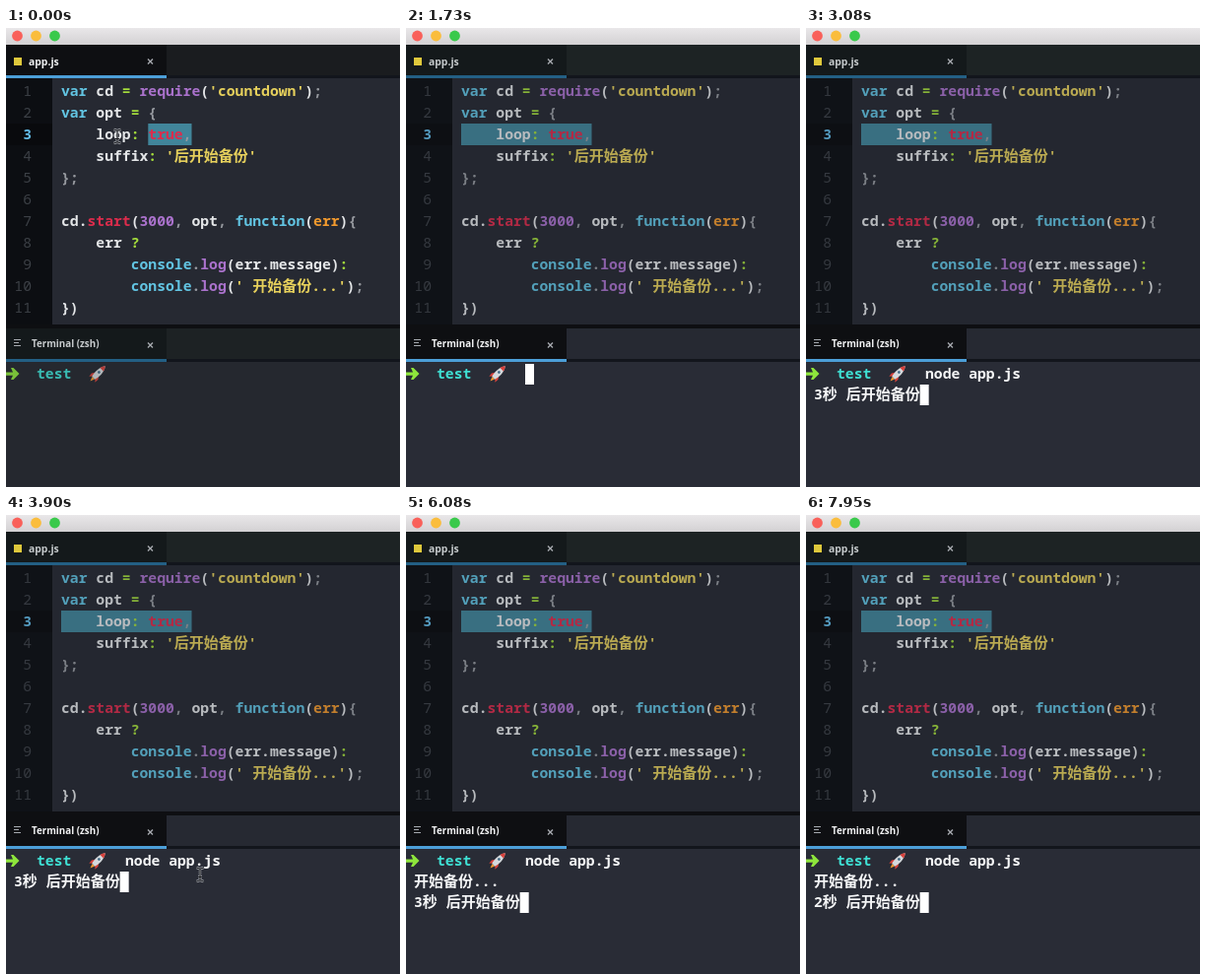
Write an HTML page with a canvas that moves like this. It is 400 px wide and 466 px high and loops after 8 s.

```html
<!DOCTYPE html>
<html lang="en">
<head>
<meta charset="utf-8">
<title>Countdown demo</title>
<style>
html, body { margin: 0; width: 100%; height: 100%; overflow: hidden; background: #262932; }
canvas { display: block; width: 400px; height: 466px; }
</style>
</head>
<body>
<canvas id="stage"></canvas>
<script>
const W = 400, H = 466, LOOP = 8000;
const FOCUS_AT = 1420, ENTER_AT = 2900, COUNT_AT = 3000;
const CELL = 8.83, WIDE = 15, LEFT = 56;
const MONO = '14.72px "Noto Sans Mono", "DejaVu Sans Mono", monospace';
const HAN = '700 15px "Noto Sans CJK SC", "Noto Sans CJK", sans-serif';

const C = {
  text: '#e4e6e8', cyan: '#62c4e2', green: '#a4dc3c', purple: '#aa72cc',
  yellow: '#e6d05c', red: '#dc2c4c', orange: '#f29a2e', grey: '#96999f'
};

const CODE = [
  [0, ['var', 'cyan'], [' cd ', 'text'], ['= ', 'green'], ['require', 'purple'], ['(', 'text'],
    ["'countdown'", 'yellow'], [')', 'text'], [';', 'grey']],
  [0, ['var', 'cyan'], [' opt ', 'text'], ['= ', 'green'], ['{', 'grey']],
  [4, ['loop', 'text'], [': ', 'green'], ['true', 'red'], [',', 'grey']],
  [4, ['suffix', 'text'], [': ', 'green'], ["'后开始备份'", 'yellow']],
  [0, ['};', 'grey']],
  [0],
  [0, ['cd.', 'text'], ['start', 'red'], ['(', 'text'], ['3000', 'purple'],
    [', ', 'grey'], ['opt', 'text'], [', ', 'grey'], ['function', 'cyan'], ['(', 'text'],
    ['err', 'orange'], [')', 'text'], ['{', 'grey']],
  [4, ['err ', 'text'], ['?', 'green']],
  [8, ['console', 'cyan'], ['.', 'grey'], ['log', 'purple'], ['(err.message)', 'text'], [':', 'green']],
  [8, ['console', 'cyan'], ['.', 'grey'], ['log', 'purple'], ['(', 'text'],
    ["' 开始备份...'", 'yellow'], [')', 'text'], [';', 'grey']],
  [0, ['})', 'text']],
  [0]
];

// Moments at which each character of the command appears.
const COMMAND = 'node app.js';
const KEYS = [1860, 1950, 2030, 2110, 2210, 2330, 2450, 2530, 2610, 2690, 2770];

const canvas = document.getElementById('stage');
const ctx = canvas.getContext('2d');
const ratio = window.devicePixelRatio || 1;
canvas.width = W * ratio;
canvas.height = H * ratio;

function rect(x, y, w, h, color) {
  ctx.fillStyle = color;
  ctx.fillRect(x, y, w, h);
}

function dot(x, y, r, color) {
  ctx.fillStyle = color;
  ctx.beginPath();
  ctx.arc(x, y, r, 0, Math.PI * 2);
  ctx.fill();
}

function lines(points, color, width) {
  ctx.strokeStyle = color;
  ctx.lineWidth = width;
  ctx.beginPath();
  for (const [x1, y1, x2, y2] of points) {
    ctx.moveTo(x1, y1);
    ctx.lineTo(x2, y2);
  }
  ctx.stroke();
}

function shape(color, path) {
  ctx.fillStyle = color;
  ctx.fill(new Path2D(path));
}

// Draws mixed Latin and Han text on the cell grid; returns the end x.
function write(str, x, y, color, weight = 600) {
  ctx.fillStyle = color;
  for (const run of str.match(/[\u4e00-\u9fff]+|[^\u4e00-\u9fff]+/g) || []) {
    const han = run.charCodeAt(0) >= 0x4e00;
    ctx.font = han ? HAN : weight + ' ' + MONO;
    ctx.fillText(run, x, y);
    x += run.length * (han ? WIDE : CELL);
  }
  return x;
}

function label(str, x, y, size, active) {
  ctx.font = '700 ' + size + 'px "Open Sans", sans-serif';
  ctx.fillStyle = active ? '#f0f1f2' : '#c6cacc';
  ctx.fillText(str, x, y);
}

function closeMark(x, y) {
  lines([[x - 2.5, y - 2.5, x + 2.5, y + 2.5], [x + 2.5, y - 2.5, x - 2.5, y + 2.5]], '#a8abb0', 1.4);
}

function ease(t, from, to) {
  const p = Math.min(1, Math.max(0, (t - from) / (to - from)));
  return p * p * (3 - 2 * p);
}

function titleBar() {
  const g = ctx.createLinearGradient(0, 0, 0, 17);
  g.addColorStop(0, '#e9e7e9');
  g.addColorStop(1, '#d3d1d3');
  rect(0, 0, W, 17, g);
  dot(11.5, 8, 5.4, '#f9605a');
  dot(30.5, 8, 5.4, '#fabd3c');
  dot(49.5, 8, 5.4, '#39c94b');
}

function tabBar(y, active, back) {
  rect(0, y, W, 34, back);
  rect(0, y, 163, 31, active ? '#0e0f12' : '#14191b');
  rect(0, y + 31, 163, 3, active ? '#4c9fd8' : '#235f84');
  rect(163, y + 31, W - 163, 3, '#12151c');
  closeMark(146.5, y + 17);
}

function editor(t, active) {
  tabBar(17, active, active ? '#1a1c1f' : '#1d2324');
  rect(8, 30, 8, 8, '#dfc83c');
  label('app.js', 23, 38, 10.4, active);

  ctx.save();
  ctx.beginPath();
  ctx.rect(0, 51, W, 250);
  ctx.clip();
  rect(0, 51, W, 250, '#262932');
  rect(0, 51, 47, 250, '#0c0e12');
  rect(0, 97, 47, 22, '#090a0d');

  const col = t < 80 ? 10 : Math.max(0, Math.round((113 - 57 * ease(t, 80, 330) - LEFT) / CELL));
  const selX = LEFT + col * CELL;
  rect(selX, 97, 188.5 - selX, 22, '#41859a');

  CODE.forEach(([indent, ...parts], i) => {
    const y = 69 + i * 22;
    const num = String(i + 1);
    const current = i === 2;
    write(num, 26 - num.length * CELL, y, current ? '#63bce8' : '#3c4046', current ? 700 : 500);
    let x = LEFT + indent * CELL;
    for (const [str, color] of parts) x = write(str, x, y, C[color]);
  });
  if (!active) rect(0, 51, W, 250, 'rgba(31,35,42,0.22)');
  ctx.restore();
}

function rocket() {
  ctx.save();
  ctx.translate(93, 351);
  ctx.rotate(Math.PI / 4);
  shape('#f59a32', 'M-1.8 6 L0 10.5 L1.8 6Z');
  shape('#d8423c', 'M-2 0 L-4.6 4 L-4.2 8 L-1.6 5Z M2 0 L4.6 4 L4.2 8 L1.6 5Z');
  shape('#d5dadd', 'M0 -11 C4 -6 3.4 2 2 6 L-2 6 C-3.4 2 -4 -6 0 -11Z');
  shape('#d8423c', 'M0 -11 C1.4 -9.2 2 -8 2.4 -6 L-2.4 -6 C-2 -8 -1.4 -9.2 0 -11Z');
  dot(0, -2, 1.4, '#426b87');
  ctx.restore();
}

function terminal(t, active) {
  rect(0, 301, W, 4, '#0e0f12');
  tabBar(305, active, active ? '#262932' : '#1d2224');
  lines([[8, 316.5, 15, 316.5], [8, 319.5, 13, 319.5], [8, 322.5, 15, 322.5]], '#a7abb1', 1);
  label('Terminal (zsh)', 26, 323.5, 9.8, active);

  rect(0, 339, W, 127, active ? '#292c36' : '#25282f');
  shape('#8ee63c', 'M0 349.5 H7 L5 345 H7.5 L13.5 351 L7.5 357 H5 L7 352.7 H0Z');
  write('test', 31, 356, '#3fe0d4', 700);
  rocket();

  const white = '#f4f5f6';
  const typed = KEYS.filter(k => t >= k).length;
  let x = write(COMMAND.slice(0, typed), 121, 356, white, 700);
  let top = 341;
  if (t >= ENTER_AT) {
    x = 0;
    top = 362;
  }
  if (t >= COUNT_AT) {
    const tick = Math.floor((t - COUNT_AT) / 1000);
    if (tick >= 3) {
      write('开始备份...', 8, 377, white, 700);
      top = 383;
    }
    x = write(3 - tick % 3 + '秒 后开始备份', 8, top + 15, white, 700);
  }
  if (active) rect(x, top, 9, 21, '#ffffff');
  else rect(0, 339, W, 127, 'rgba(37,40,47,0.2)');
}

function beam(x, y) {
  const strokes = [
    [x, y - 6, x, y + 6],
    [x - 3.5, y - 7, x - 0.5, y - 6], [x + 3.5, y - 7, x + 0.5, y - 6],
    [x - 3.5, y + 7, x - 0.5, y + 6], [x + 3.5, y + 7, x + 0.5, y + 6],
    [x - 2, y + 2.5, x + 2, y + 2.5]
  ];
  lines(strokes, 'rgba(205,208,212,0.8)', 2.4);
  lines(strokes, '#15171b', 1.1);
}

function pointer(t) {
  if (t < 1650) {
    const drag = ease(t, 80, 330), move = ease(t, 350, 800);
    const x = 113 - 55 * drag;
    beam(x + (154 - x) * move, 110 + 266 * move);
  } else if (t >= 3720 && t < 4120) {
    const p = ease(t, 3720, 3900);
    beam(185 + 12 * p, 369 - 4 * p);
  }
}

function draw(t) {
  const inTerminal = t >= FOCUS_AT;
  ctx.setTransform(ratio, 0, 0, ratio, 0, 0);
  titleBar();
  editor(t, !inTerminal);
  terminal(t, inTerminal);
  pointer(t);
}

const start = performance.now();
function frame() {
  draw((performance.now() - start) % LOOP);
  requestAnimationFrame(frame);
}
frame();
</script>
</body>
</html>
```
